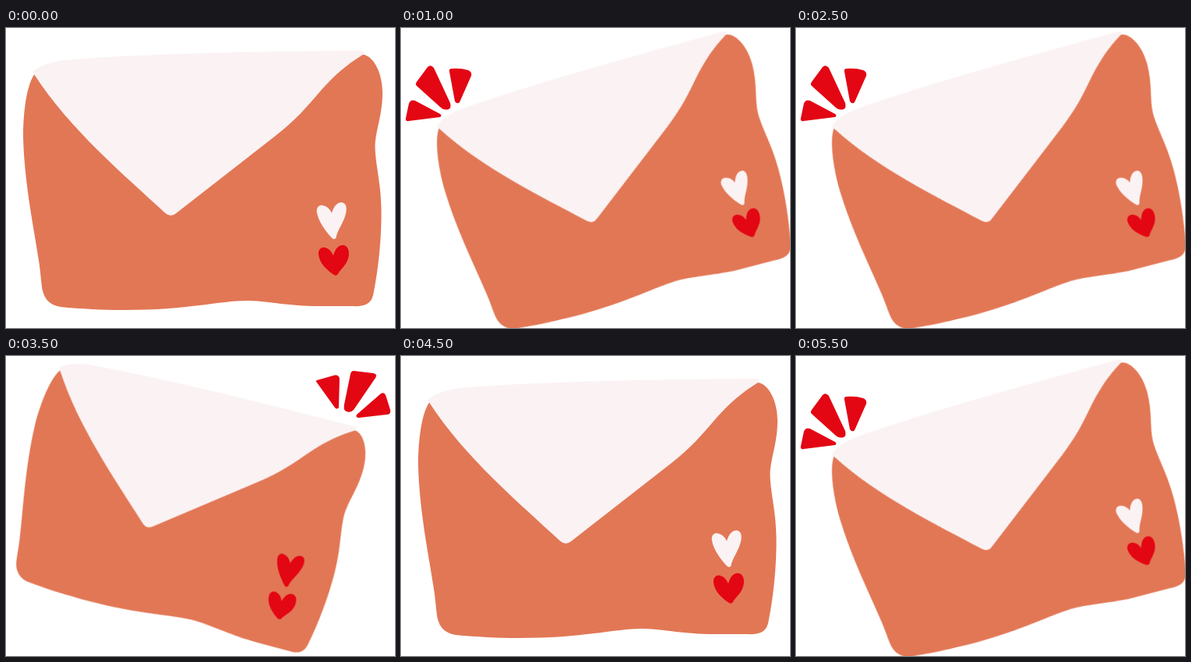
These frames come from a looping animation (498x384 px, 6 s). An HTML page:

```html
<!DOCTYPE html>
<html lang="en">
<head>
<meta charset="utf-8">
<title>Envelope</title>
<style>
  html, body { margin: 0; width: 100%; height: 100%; overflow: hidden; background: #fff; }
  svg { display: block; width: 100%; height: 100%; }
  .red { fill: #e30613; }
  .pale { fill: #fbf2f3; }
  .body { fill: #e27755; }

  /* Three held poses: straight, leaning right, leaning left */
  .envelope, .top-heart, .rays { animation: 1.5s step-end infinite; }
  .envelope { transform-origin: 0 0; animation-name: rock; }
  .top-heart { animation-name: blush; }
  .rays { visibility: hidden; }
  .rays.right { animation-name: flash-right; }
  .rays.left { animation-name: flash-left; }

  @keyframes rock {
    0% { transform: none; }
    33.3333% { transform: translate(69px, 18px) rotate(14.95deg) scale(.915) translate(-36px, -59px); }
    66.6667%, 100% { transform: translate(48.3px, 128px) rotate(-14.6deg) scale(.917) translate(-36px, -59px); }
  }
  @keyframes blush {
    0%, 66.6667%, 100% { fill: #fbf2f3; }
    33.3333% { fill: #e30613; }
  }
  @keyframes flash-right {
    0%, 66.6667%, 100% { visibility: hidden; }
    33.3333% { visibility: visible; }
  }
  @keyframes flash-left {
    0%, 33.3333% { visibility: hidden; }
    66.6667%, 100% { visibility: visible; }
  }
</style>
</head>
<body>
<svg viewBox="0 0 498 384" preserveAspectRatio="none">
  <g class="envelope">
    <path class="body" d="M36.500 59C27 72 22 105 22 140C23.500 200 36.500 260 41.500 295C44.500 313 44.500 322 46.500 335C49.500 348 57 355 70 357C95 359.500 125 361 150 361C235 361 272 349 310 349C340 350 362 356 400 356H442C460 357 467 353 470 342C477 308 481 268 480.500 232C480 197 473 176 472.500 152C473 131 482 112 482 83C482 58 471 36 457 34Z"/>
    <path class="pale" d="M36.500 60L34 56C40 50 58 42 82 40.500C160 34 300 30 453 29Q461 29 457 34C436 47 421 60 404 79C386 100 371 118 345 138L218 237Q211 243 204 237C150 187 82 130 36.500 60Z"/>
    <path class="top-heart" d="M417 237C420 227 425 222.500 431 223.500C437 225 437 234 433 244C429 254 424 260 422.500 268.500Q420 272 417 268.500C409 260 400 248 398 236C397 230 401 226 405 227C411 228 415 232 417 237Z"/>
    <path class="red" d="M419 291.500C421 283 426 277 432 278C439 279 441 289 437 298C434 305 428 309 425 315Q422 318.500 418.500 315C410 309 401 301 400 289C400 283 404 280 408 281C413 282 417 286 419 291.500Z"/>
  </g>
  <g class="rays right red">
    <path d="M398 31L421 24.500Q427 24 427 30L426 66Q424 69 421 66L398 34Q396 32 398 31Z"/>
    <path d="M445 19L470 22Q476 23 473 28L445 69Q440 74 434 70Q432 67 433 62L441 23Q442 19 445 19Z"/>
    <path d="M449 75L480 48Q484 46 486 50L492 69Q493 75 487 75L452 79Q447 79 449 75Z"/>
  </g>
  <g class="rays left red">
    <path d="M6 116L10 97Q12 91 18 93L50 110Q53 112 50 114L10 119Q6 120 6 116Z"/>
    <path d="M20 69L34 50Q38 46 42 51L63 96Q65 104 59 104.500Q54 105 50 101L20 74Q18 72 20 69Z"/>
    <path d="M65 52Q76 51 86 54Q91 56 90 61L75 95Q72 98 69 94L62 56Q61 52 65 52Z"/>
  </g>
</svg>
</body>
</html>
```
